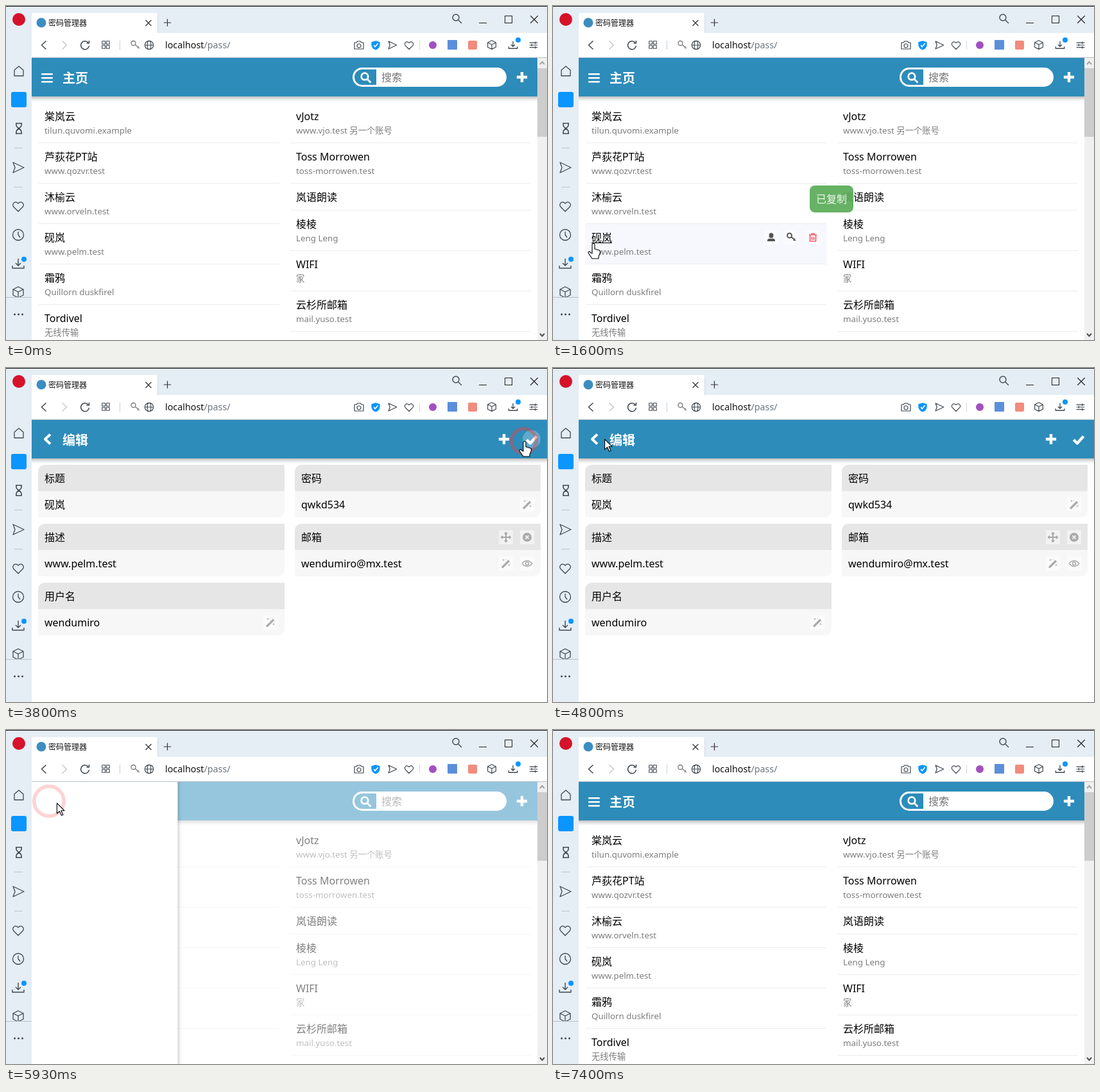
An HTML page with a canvas that plays this animation: 843 px wide and 521 px high, repeating every 7470 ms.

```html
<!DOCTYPE html>
<html lang="zh">
<head>
<meta charset="utf-8">
<title>密码管理器</title>
<style>
html, body { margin: 0; width: 100%; height: 100%; overflow: hidden; background: #fff; }
canvas { display: block; }
</style>
</head>
<body>
<canvas id="stage" width="843" height="521"></canvas>
<script>
const c = document.getElementById('stage').getContext('2d');
const LOOP = 7470, STEP = 200 / 3;
const FONT = '"Noto Sans", "Noto Sans CJK SC", "Noto Sans CJK", sans-serif';
const BLUE = '#2d8cba', INK = '#3f474f', SIDE = '#e5edf5', DOT = '#0a95ff';

const T = { toast: 1000, toastEnd: 1660, view: 2060, edit: 3720, home: 4995, list: 5060 };

const LEFT = [
  ['棠岚云', 'tilun.quvomi.example'], ['芦荻花PT站', 'www.qozvr.test'],
  ['沐榆云', 'www.orveln.test'], ['砚岚', 'www.pelm.test'],
  ['霜鸦', 'Quillorn duskfirel'], ['Tordivel', '无线传输']
];
const RIGHT = [
  ['vJotz', 'www.vjo.test 另一个账号'], ['Toss Morrowen', 'toss-morrowen.test'],
  ['岚语朗读'], ['棱棱', 'Leng Leng'], ['WIFI', '家'], ['云杉所邮箱', 'mail.yuso.test']
];
const USER = 'wendumiro';
const FIELDS = [
  [50, 151, '标题', '砚岚', ''], [50, 243, '描述', 'www.pelm.test', ''],
  [50, 335, '用户名', USER, 'w'], [450, 151, '密码', 'qwkd534', 'w'],
  [450, 243, '邮箱', USER + '@mx.test', 'we']
];

// Pointer path: time, x, y
const PATH = [
  [130, 72, 503], [400, 130, 462], [800, 372, 363], [1200, 372, 363], [1530, 70, 371],
  [1600, 62, 370], [1667, 76, 365], [1733, 67, 361], [2270, 67, 361], [2670, 592, 166],
  [3330, 807, 114], [4000, 807, 114], [4870, 67, 111], [5870, 67, 111], [6400, 382, 193],
  [6930, 382, 193], [7200, 260, 310], [7267, 150, 378], [7334, 70, 495]
];
// Clicks: time, x, y
const CLICKS = [[930, 372, 363], [1925, 67, 361], [3625, 807, 114],
  [4980, 67, 111], [5660, 67, 111], [6718, 382, 193]];

const I = {
  home: 'M-7-2L0-8 7-2V7H-7Z',
  glass: 'M-5-8H5M-5 8H5M-4-8V-5Q-4-3 0 0Q4 3 4 5V8M4-8V-5Q4-3 0 0Q-4 3-4 5V8',
  send: 'M-8-8L9 0-8 8-5 0Z',
  heart: 'M0 7.500L-7 .5C-11-4-5-10 0-5C5-10 11-4 7 .5Z',
  clock: 'M8.500 0A8.500 8.500 0 1 1-8.500 0A8.500 8.500 0 1 1 8.500 0M0-5V0L3 4',
  down: 'M0-8V3M-4-1L0 3 4-1M-9 3V7H9V3',
  cube: 'M0-9L8-5V4L0 8-8 4V-5ZM-8-5L0-1 8-5M0-1V8',
  cross: 'M-5-5L5 5M5-5L-5 5',
  plus: 'M-6 0H6M0-6V6',
  lens: 'M4 -1A5 5 0 1 1-6-1A5 5 0 1 1 4-1M3 3L8 8',
  prev: 'M3.500-6.500L-3.500 0 3.500 6.500',
  next: 'M-3.500-6.500L3.500 0-3.500 6.500',
  reload: 'M5 -4A6.500 6.500 0 1 0 6.500 1M6.500-7V-3H2.500',
  grid: 'M-6-6H-1V-1H-6ZM1-6H6V-1H1ZM-6 1H-1V6H-6ZM1 1H6V6H1Z',
  key: 'M0-3A3.500 3.500 0 1 1-7-3A3.500 3.500 0 1 1 0-3M-1-1L6 5M3 5L5 2',
  globe: 'M7 0A7 7 0 1 1-7 0A7 7 0 1 1 7 0M-7 0H7M3 0A3 7 0 1 1-3 0A3 7 0 1 1 3 0',
  camera: 'M-7-4H-4L-2-6H2L4-4H7V6H-7ZM3 1A3 3 0 1 1-3 1A3 3 0 1 1 3 1',
  shield: 'M0-7L7-5V0Q6 6 0 8Q-6 6-7 0V-5Z',
  tick: 'M-3 0L-1 3 4-3',
  sliders: 'M-7-4H7M-7 0H7M-7 4H7M3-6V-2M-3-2V2M3 2V6',
  person: 'M3.500-3A3.500 4 0 1 1-3.500-3A3.500 4 0 1 1 3.500-3M-6 6V4Q-5 1 0 2Q5 1 6 4V6Z',
  bin: 'M-6-4H6M-2-4V-6H2V-4M-4.500-4V6H4.500V-4M-1.500-1V4M1.500-1V4',
  eye: 'M-8 0Q0-9 8 0Q0 9-8 0M2.500 0A2.500 2.500 0 1 1-2.500 0A2.500 2.500 0 1 1 2.500 0',
  slash: 'M-10 0Q0-11 10 0Q0 11-10 0M3 0A3 3 0 1 1-3 0A3 3 0 1 1 3 0M-5-8L5 8',
  pencil: 'M-9 9L-8 4 2-6 7-1-3 9ZM3-7L5-9Q6-10 8-8L9-7Q10-5 9-4L8-2Z',
  check: 'M-7 0L-2 5 7-5',
  wand: 'M-7.500 5.500L4-6 6.500-3.500-5 8Z',
  sparks: 'M-4-7V-4M-5.500-5.500H-2.500M5 1V4M3.500 2.500H6.500M0-7V-6M7-1H6',
  move: 'M-7 0H7M0-7V7M-5-2L-7 0-5 2M5-2L7 0 5 2M-2-5L0-7 2-5M-2 5L0 7 2 5',
  hand: 'M-2 1C-2-1 2-1 2 1V8L9 10Q11 11 10.500 14L8 20V23H-2L-7.500 15C-9 12-6 11-4 14L-2 15Z',
  arrow: 'M0 0V16L4 12.500 7 19 9.500 18 6.500 11.500H11.500Z',
  beam: 'M-3-6H-1L0-5 1-6H3M0-5V5M-3 6H-1L0 5 1 6H3'
};

function icon(name, x, y, stroke, lw = 1.3, fill, k = 1) {
  const p = new Path2D(I[name]);
  c.save();
  c.translate(x, y);
  c.scale(k, k);
  c.lineJoin = 'round';
  if (fill) { c.fillStyle = fill; c.fill(p); }
  if (stroke) { c.strokeStyle = stroke; c.lineWidth = lw / k; c.stroke(p); }
  c.restore();
}
function rect(x, y, w, h, color, r = 0) {
  c.fillStyle = color;
  c.beginPath();
  c.roundRect(x, y, w, h, r);
  c.fill();
}
function disc(x, y, r, color) {
  c.fillStyle = color;
  c.beginPath();
  c.arc(x, y, r, 0, 7);
  c.fill();
}
function text(s, x, y, size, color, weight = 400) {
  c.font = `${weight} ${size}px ${FONT}`;
  c.fillStyle = color;
  c.fillText(s, x, y);
  return c.measureText(s).width;
}
const clamp = v => Math.max(0, Math.min(1, v));
const ease = v => v * v * (3 - 2 * v);

function pointer(t) {
  if (t < PATH[0][0] || t >= 7390) return null;
  const i = PATH.findIndex(k => k[0] > t);
  if (i < 0) { const k = PATH[PATH.length - 1]; return { x: k[1], y: k[2] }; }
  const a = PATH[i - 1], b = PATH[i], e = ease((t - a[0]) / (b[0] - a[0]));
  return { x: a[1] + (b[1] - a[1]) * e, y: a[2] + (b[2] - a[2]) * e };
}
function menuAt(t) {
  return t < 6300 ? ease(clamp((t - 5740) / 260)) : clamp((6863 - t) / 260);
}
function pageAt(t) {
  if (t >= T.home || t < T.view) return 'home';
  return t < T.edit ? 'view' : 'edit';
}

function drawRows(rows, x, m) {
  let y = 151;
  for (const [name, note] of rows) {
    const h = note ? 63 : 42;
    const over = m && m.y > 141 && m.y >= y && m.y < y + h && m.x >= x && m.x < x + 376;
    if (over) rect(x, y, 376, h - 1, '#f7f8fe');
    const w = text(name, x + 10, y + 27, 16, '#000');
    if (note) text(note, x + 10, y + 48, 13.33, '#7d7d7d');
    rect(x + 1, y + h - 1, 375, 1, '#ececec');
    if (over) {
      const iy = y + 21;
      [290, 322, 355].forEach(d => rect(x + d - 11, iy - 11, 22, 22, '#fbfbff', 3));
      icon('person', x + 290, iy, null, 0, '#555');
      icon('key', x + 322, iy, '#555', 1.9);
      icon('bin', x + 355, iy, '#ef5f63', 1.7);
      if (m.y < y + 35 && m.y > y + 8 && m.x > x + 9 && m.x < x + 12 + w) {
        rect(x + 10, y + 29, w, 1, '#000');
        m.kind = 'hand';
      }
      if (Math.abs(m.y - iy) < 12 && m.x > x + 279 && m.x < x + 367) m.kind = 'hand';
    }
    y += h;
  }
}

function drawTool(name, x, y) {
  rect(x - 11, y - 11, 22, 22, 'rgba(255,255,255,.45)');
  if (name === 'close') {
    disc(x, y, 7, '#aaa');
    icon('cross', x, y, '#eee', 2, null, 0.5);
  } else if (name === 'wand') {
    icon('wand', x, y, null, 0, '#aaa', 0.95);
    icon('sparks', x, y, '#b4b4b4', 1);
  } else icon(name, x, y, '#aaa', name === 'move' ? 2.2 : 1.6);
}

function drawField([x, y, label, value, tools], page, m) {
  const w = x < 100 ? 384 : 383, ix = x + 362, iy = y + 62;
  rect(x, y, w, 41, '#e6e6e6', [10, 0, 0, 0]);
  rect(x, y + 41, w, 41, '#f7f7f7', [0, 0, 10, 0]);
  text(label, x + 10, y + 27, 16, '#000');
  if (page === 'view' && label === '密码')
    for (let i = 0; i < 6; i++) disc(x + 15 + i * 10.4, y + 63, 4.4, '#000');
  else text(value, x + 10, y + 68, 16, '#000');
  if (page === 'view') {
    rect(ix - 11, iy - 11, 22, 22, '#fcfcfc');
    c.lineWidth = 1;
    c.strokeStyle = x < 100 ? '#d6cbb4' : '#dcc0e4';
    c.strokeRect(ix - 7.5, iy - 7.5, 12, 12);
    rect(ix - 4, iy - 4, 13, 13, '#fcfcfc');
    c.strokeStyle = x < 100 ? '#a9cdb9' : '#c5b5dd';
    c.strokeRect(ix - 3.5, iy - 3.5, 12, 12);
  } else {
    if (tools === 'w') drawTool('wand', ix, iy);
    if (tools === 'we') {
      drawTool('wand', ix - 33, iy);
      drawTool('eye', ix, iy);
      drawTool('move', ix - 33, y + 21);
      drawTool('close', ix, y + 21);
    }
  }
  if (m && m.x > x + 5 && m.x < x + 120 && m.y > y && m.y < y + 82) m.kind = 'beam';
}

function drawHeader(page, m) {
  const w = page === 'home' ? 788 : 803;
  const g = c.createLinearGradient(0, 141, 0, 149);
  g.addColorStop(0, 'rgba(0,0,0,.26)');
  g.addColorStop(0.5, 'rgba(0,0,0,.1)');
  g.addColorStop(1, 'rgba(0,0,0,0)');
  c.fillStyle = g;
  c.fillRect(40, 141, w, 8);
  rect(40, 81, w, 60, BLUE);
  const spots = page === 'home' ? [64, 804] : [64, 777, 819];
  if (m && m.y > 95 && m.y < 128)
    for (const s of spots)
      if (Math.abs(m.x - s) < 15) {
        disc(s, 111, 14, 'rgba(255,255,255,.25)');
        m.kind = 'hand';
      }
  const title = { home: '主页', view: '查看', edit: '编辑' }[page];
  text(title, 88, 120, 20, '#fff', 700);
  if (page === 'home') {
    for (const y of [105, 111, 117]) rect(55, y, 18, 2.6, '#fff', 1);
    rect(540, 96, 240, 30, '#fff', 15);
    rect(543, 99, 34, 24, BLUE, [12, 0, 0, 12]);
    icon('lens', 560, 111, '#fff', 2.8, null, 1.05);
    text('搜索', 585, 117, 16, '#757575');
    icon('plus', 804, 111, '#fff', 4.4, null, 1.35);
    return;
  }
  icon('prev', 65, 111, '#fff', 4, null, 1.15);
  if (page === 'view') {
    icon('slash', 777, 113, '#fff', 2);
    icon('pencil', 819, 112, null, 0, '#fff', 0.95);
  } else {
    icon('plus', 776, 111, '#fff', 4.4, null, 1.35);
    icon('check', 819, 112, '#fff', 4.4, null, 1.1);
  }
}

function drawScrollbar() {
  rect(828, 81, 15, 440, '#f0f0f0');
  rect(828, 97, 15, 107, '#cdcdcd');
  c.lineWidth = 2;
  [[89, 2, '#a5a5a5'], [513, -2, '#505050']].forEach(([y, d, color]) => {
    c.strokeStyle = color;
    c.beginPath();
    c.moveTo(832, y + d);
    c.lineTo(835.5, y - d);
    c.lineTo(839, y + d);
    c.stroke();
  });
}

function drawMenu(p) {
  if (p <= 0) return;
  c.save();
  c.beginPath();
  c.rect(40, 81, 788, 440);
  c.clip();
  rect(40, 81, 788, 440, `rgba(255,255,255,${0.5 * (1 - (1 - p) ** 4)})`);
  c.shadowColor = 'rgba(0,0,0,.3)';
  c.shadowBlur = 6;
  rect(40 + 272 * (p - 1), 75, 272, 460, '#fff');
  c.restore();
}

function drawChrome() {
  rect(0, 0, 843, 42, SIDE);
  rect(0, 42, 40, 479, SIDE);
  rect(0, 0, 843, 1, '#15181b');
  rect(40, 11, 196, 31, '#fff', [2, 2, 0, 0]);
  rect(236, 14, 1, 28, '#d3dbe3');
  rect(40, 42, 803, 38, '#fff');
  rect(40, 80, 803, 1, '#b5c1cb');

  disc(20, 21, 10, '#d5122a');
  disc(55, 26, 7.5, '#3c8dc0');
  text('密码管理器', 66, 30.5, 12, '#111');
  icon('cross', 222, 26.5, '#333', 1.2, null, 0.9);
  icon('plus', 251.5, 26, '#333', 1.2, null, 0.95);
  icon('lens', 702, 19, INK, 1.4);
  rect(737, 26, 12, 1, '#222');
  c.strokeStyle = '#222';
  c.lineWidth = 1;
  c.strokeRect(777.5, 15.5, 11, 11);
  icon('cross', 823, 21, '#222', 1.2, null, 1.15);

  icon('prev', 59, 61, INK, 1.5);
  icon('next', 91, 61, '#c3c8cd', 1.5);
  icon('reload', 123, 61, INK, 1.5);
  icon('grid', 155.5, 60.5, INK, 1.1, null, 0.95);
  rect(177, 54, 1, 14, '#c9d0d6');
  icon('key', 202, 61, '#777', 1.3);
  icon('globe', 223, 61, INK, 1.2, null, 0.95);
  const w = text('localhost', 248, 66, 14.3, '#111');
  text('/pass/', 248 + w, 66, 14.3, '#6b7580');
  icon('camera', 550, 61, INK, 1.2);
  icon('shield', 576, 61, null, 0, DOT, 0.95);
  icon('tick', 576, 61, '#fff', 1.6, null, 0.9);
  icon('send', 602, 61, INK, 1.2, null, 0.75);
  icon('heart', 628, 61.5, INK, 1.2, null, 0.8);
  rect(644, 54, 1, 14, '#d4dade');
  disc(665, 61, 6, '#a34fc0');
  rect(688, 53, 15, 15, '#5b8fdc', 1);
  rect(720, 54, 14, 14, '#f28b7d', 2);
  icon('cube', 757, 61, INK, 1.2, null, 0.8);
  icon('down', 790, 61, INK, 1.3, null, 0.75);
  disc(798, 53, 4, DOT);
  icon('sliders', 822, 61, INK, 1.2, null, 0.9);

  icon('home', 20, 102, INK);
  rect(8, 134, 24, 24, DOT, 3);
  icon('glass', 20, 191, INK, 1.6);
  rect(13, 221, 13, 1, '#bcc6cf');
  icon('send', 19, 252, INK);
  rect(13, 282, 13, 1, '#bcc6cf');
  icon('heart', 19, 313, INK);
  icon('clock', 19, 357, INK);
  icon('down', 19, 402, INK, 1.4);
  disc(28, 395, 4, DOT);
  icon('cube', 19, 447, INK, 1.3);
  rect(0, 454, 40, 67, SIDE);
  rect(0, 454, 40, 1, '#b7c2cc');
  for (const x of [13.5, 19.5, 25.5]) disc(x, 481, 1.5, INK);
}

function drawToast(t) {
  if (t < T.toast - 5 || t >= T.toastEnd) return;
  rect(400, 280, 68, 42, 'rgba(92,173,90,.93)', 8);
  text('已复制', 410, 307, 16, 'rgba(255,255,255,.9)');
}

function drawClicks(t) {
  for (const [at, x, y] of CLICKS) {
    const p = (t - at) / 400;
    if (p < 0 || p >= 1) continue;
    c.strokeStyle = `rgba(245,60,60,${0.7 * (1 - p)})`;
    c.lineWidth = 5.5;
    c.beginPath();
    c.arc(x, y, 12.3 + 16 * p, 0, 7);
    c.stroke();
  }
}

function drawPointer(m) {
  if (!m) return;
  if (m.kind === 'beam') icon('beam', m.x + 2, m.y + 3, '#222', 1);
  else if (m.kind === 'hand') icon('hand', m.x + 1, m.y + 1, '#000', 1.1, '#fff');
  else icon('arrow', m.x, m.y, '#000', 1.1, '#fff');
}

function draw(t) {
  const page = pageAt(t), menu = menuAt(t), m = pointer(t);
  if (m) m.kind = 'arrow';
  const live = menu > 0 ? null : m;
  rect(0, 0, 843, 521, '#fff');
  if (page === 'home') {
    if (t < T.view || t >= T.list) {
      drawRows(LEFT, 50, live);
      drawRows(RIGHT, 442, live);
    }
    drawHeader(page, live);
    drawScrollbar();
  } else {
    FIELDS.forEach(f => drawField(f, page, live));
    drawHeader(page, live);
  }
  drawMenu(menu);
  drawChrome();
  drawToast(t);
  drawClicks(t);
  drawPointer(m);
}

// The screen runs at 15 pictures a second
const start = performance.now();
function tick() {
  const t = (performance.now() - start) % LOOP;
  draw(Math.floor((t + 4) / STEP) * STEP);
  requestAnimationFrame(tick);
}
tick();
</script>
</body>
</html>
```
